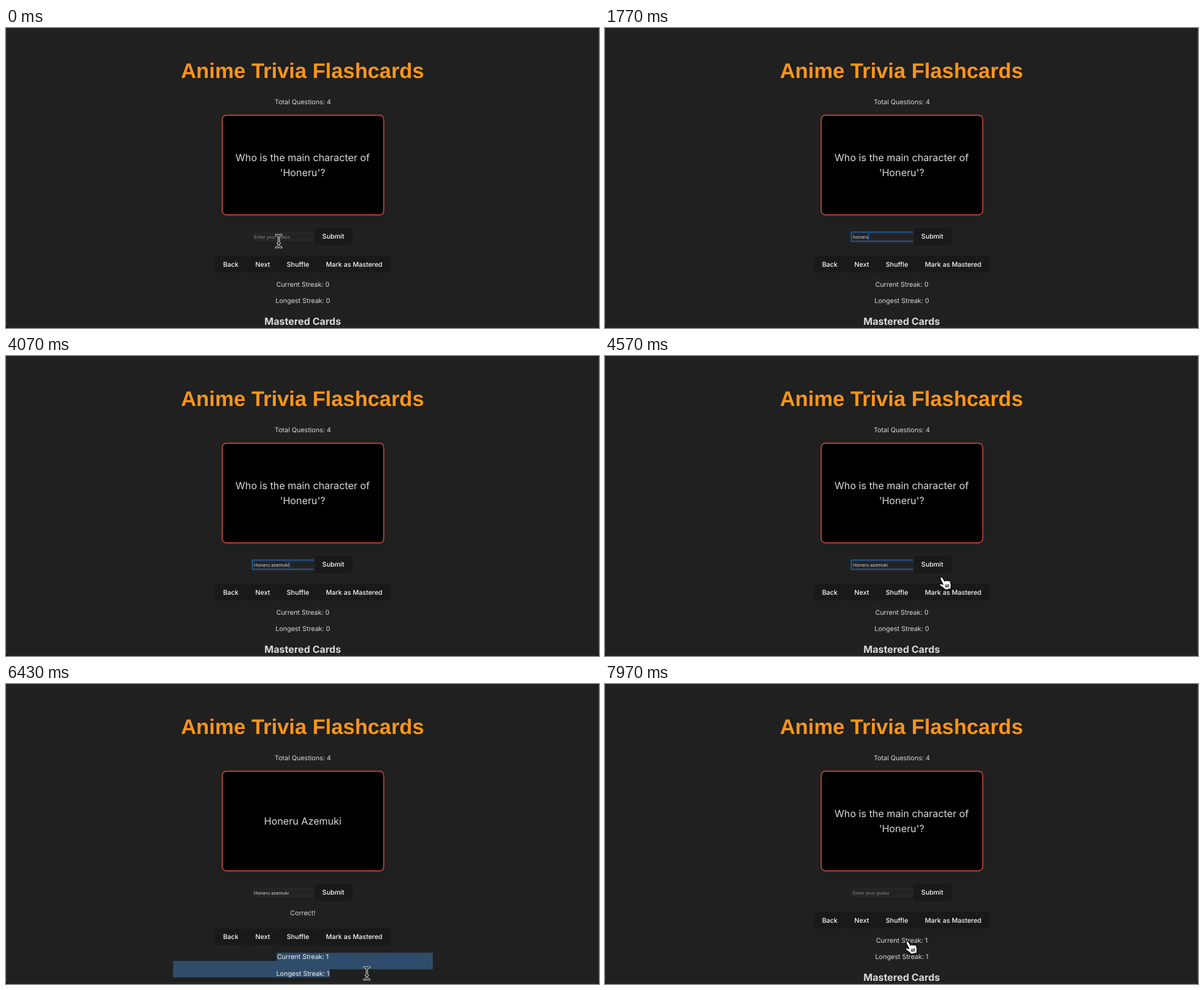
Write an HTML page that moves like this. It is 949 by 480 pixels and loops after 8 s.

```html
<!DOCTYPE html>
<html lang="en">
<head>
<meta charset="utf-8">
<title>Anime Trivia Flashcards</title>
<style>
  html, body { margin: 0; width: 100%; height: 100%; overflow: hidden; background: #160b10; }
  svg { display: block; width: 949px; height: 480px; }
  text { font: 400 10.53px Inter, sans-serif; fill: #dadada; text-anchor: middle; text-rendering: geometricPrecision; }
  .title { font: 700 33.85px "Liberation Sans", Arial, sans-serif; fill: #f8951a; }
  .card text { font-size: 15.8px; }
  .heading { font-size: 15.8px; font-weight: 700; }
  .button rect { fill: #191919; }
  .button text { font-weight: 500; fill: #fafafa; }
  .button.hover rect { stroke: #3565b0; stroke-width: 1; }
  .selected text { fill: #f4f4f4; }
  #value { font-size: 7.24px; text-anchor: start; }
  #value.placeholder { fill: #8c8c8c; }
  .outline { stroke-linejoin: round; stroke-linecap: round; fill: none; }
</style>
</head>
<body>
<svg viewBox="0 0 949 480">
  <defs>
    <path id="beamLine" d="M-4.2-10Q-.8-10 0-7.8Q.8-10 4.2-10M0-7.8V7.8M-4.2 10Q-.8 10 0 7.8Q.8 10 4.2 10M-1.6 3H1.6"/>
  </defs>

  <path d="M0 0H949V474Q949 479 944 479H5Q0 479 0 474Z" fill="#202020"/>
  <path d="M.5 0V474Q.5 478.5 5 478.5H944Q948.5 478.5 948.5 474V0" fill="none" stroke="#383838"/>

  <text class="title" x="474.5" y="80">Anime Trivia Flashcards</text>
  <text x="475" y="121.6">Total Questions: 4</text>

  <g class="card">
    <rect x="346" y="139.5" width="258.5" height="159.5" rx="6.5" fill="#000" stroke="#e8473c" stroke-width="1.4"/>
    <g id="question">
      <text x="474.7" y="212.7">Who is the main character of</text>
      <text x="474.7" y="236.5">'Honeru'?</text>
    </g>
    <text id="answer" x="474.9" y="224.6">Honeru Azemuki</text>
  </g>

  <rect x="396" y="328" width="97.5" height="11.5" fill="#232323" stroke="#333" stroke-width=".8"/>
  <rect id="ring" x="394.2" y="326.6" width="101" height="14.8" rx="1.5" fill="none" stroke="#20588f" stroke-width="2"/>
  <text id="value" x="397" y="337"></text>
  <rect id="caret" y="329.6" width="1.1" height="8.8" fill="#3478e8"/>
  <g class="button" id="submit">
    <rect x="493.5" y="320" width="61.2" height="27" rx="5.3"/>
    <text x="523.7" y="337.3">Submit</text>
  </g>
  <text id="correct" x="475" y="369.8">Correct!</text>

  <g id="lower">
    <g class="button">
      <rect x="334.3" y="364.7" width="51.5" height="26.6" rx="5.3"/>
      <text x="359.8" y="382">Back</text>
    </g>
    <g class="button">
      <rect x="385.8" y="364.7" width="50.2" height="26.6" rx="5.3"/>
      <text x="410.8" y="382">Next</text>
    </g>
    <g class="button" id="shuffle">
      <rect x="436" y="364.7" width="63" height="26.6" rx="5.3"/>
      <text x="467.2" y="382">Shuffle</text>
    </g>
    <g class="button">
      <rect x="499" y="364.7" width="117" height="26.6" rx="5.3"/>
      <text x="557.2" y="382">Mark as Mastered</text>
    </g>
    <path id="selection" fill="#2f4c6a"/>
    <g id="streaks">
      <text id="current" x="475" y="414"></text>
      <text id="longest" x="475" y="440.4"></text>
    </g>
    <text class="heading" x="474.8" y="474.6">Mastered Cards</text>
  </g>

  <g id="beam" class="outline">
    <use href="#beamLine" stroke="#fff" stroke-width="3.2"/>
    <use href="#beamLine" stroke="#000" stroke-width="1.3"/>
  </g>
  <g id="hand">
    <g class="outline" stroke="#000" stroke-width="1.1" transform="rotate(-12) scale(1.05)">
      <path fill="#fff" d="M-2.5 1.5C-2.5-.6.6-1 1.5 1L3.6 7C4 5.5 6.4 5.7 6.8 7.2C7.5 6.2 9.3 6.6 9.6 8C10.5 7.4 11.8 8 11.8 9.5L12 13C12 15.8 10.8 16 10.5 20H1.5C1 17.5-3.5 14-5 11.5C-6 9.8-3.5 8.5-1.8 10.2L0 11.5Z"/>
      <path d="M3.3 12.5L3.6 16.8M5.7 12.5V16.8M8.1 12.5L7.9 16.8"/>
    </g>
  </g>
</svg>
<script>
const LOOP = 8000, SHIFT = 26.4;
const FIRST = 'honeru', SECOND = 'Honeru azemuki';
const CLICK = { input: 300, submit: 5130, deselect: 6750, shuffle: 7620 };
const DRAG = 5900;

// Pointer path: time, x, y, shape
const path = [
  [0, 436.5, 341, 'beam'], [700, 436.5, 341, ''],
  [4230, 436.5, 341, 'beam'], [4380, 500, 358, 'hand'],
  [4570, 538.5, 354, 'hand'], [4850, 526, 338, 'hand'],
  [5530, 526, 338, 'hand'], [5670, 514.5, 427.5, 'hand'],
  [5800, 434, 435, 'beam'], [DRAG, 433, 436, 'beam'],
  [6350, 577.5, 463, 'beam'], [6800, 577.5, 463, 'beam'],
  [7250, 474, 404, 'hand'], [7700, 474, 404, 'hand'],
  [7970, 484, 412, 'hand'], [8000, 484, 412, 'hand']
];

const $ = id => document.getElementById(id);
const show = (id, on) => { $(id).style.display = on ? '' : 'none'; };
const within = (t, a, b) => t >= a && t < b;
const ramp = (t, a, b) => Math.max(0, Math.min(1, (t - a) / (b - a)));
const typed = (word, t, a, b) => word.slice(0, Math.floor(ramp(t, a, b) * word.length));

function pointerAt(t) {
  const next = path.findIndex(p => p[0] > t);
  const [t0, x0, y0, shape] = path[next - 1], [t1, x1, y1] = path[next];
  const u = ramp(t, t0, t1), e = u * u * (3 - 2 * u);
  return { x: x0 + (x1 - x0) * e, y: y0 + (y1 - y0) * e, shape };
}

function inputText(t) {
  if (t < 1950) return typed(FIRST, t, 800, 1600);
  if (t < 2550) return typed(FIRST, t, 2500, 1950);
  return t < CLICK.shuffle ? typed(SECOND, t, 2550, 3950) : '';
}

function selectionPath(p) {
  const top = 403.5;
  if (p.y < 449) return `M433 ${top}H${Math.max(433, Math.min(517, p.x))}v26.5H433Z`;
  return `M433 ${top}H683v26.5H${Math.min(518.5, p.x)}v13H267.5v-26.5H433Z`;
}

function draw(t) {
  const p = pointerAt(t);
  const solved = within(t, CLICK.submit, CLICK.shuffle);
  const focused = within(t, CLICK.input, CLICK.submit);
  const selecting = within(t, DRAG, CLICK.deselect);
  const streak = t >= CLICK.submit ? 1 : 0;
  const value = inputText(t);

  show('question', !solved);
  show('answer', solved);
  show('correct', solved);
  show('ring', focused);
  $('lower').setAttribute('transform', `translate(0 ${solved ? SHIFT : 0})`);
  $('current').textContent = `Current Streak: ${streak}`;
  $('longest').textContent = `Longest Streak: ${streak}`;

  $('value').textContent = value || 'Enter your guess';
  $('value').classList.toggle('placeholder', !value);
  $('caret').setAttribute('x', 397 + (value ? $('value').getComputedTextLength() : 0));
  const blinkOn = t < 4450 || (t - 4450) % 1000 >= 500;
  show('caret', focused && blinkOn);

  $('submit').classList.toggle('hover', within(t, 4780, 5720));
  $('shuffle').classList.toggle('hover', within(t, 7200, CLICK.shuffle));
  $('selection').setAttribute('d', selecting ? selectionPath(p) : '');
  $('streaks').classList.toggle('selected', selecting);

  for (const shape of ['beam', 'hand']) {
    show(shape, p.shape === shape);
    $(shape).setAttribute('transform', `translate(${p.x} ${p.y})`);
  }
}

const start = performance.now();
function tick() {
  draw(Math.max(0, performance.now() - start) % LOOP);
  requestAnimationFrame(tick);
}
tick();
</script>
</body>
</html>
```
